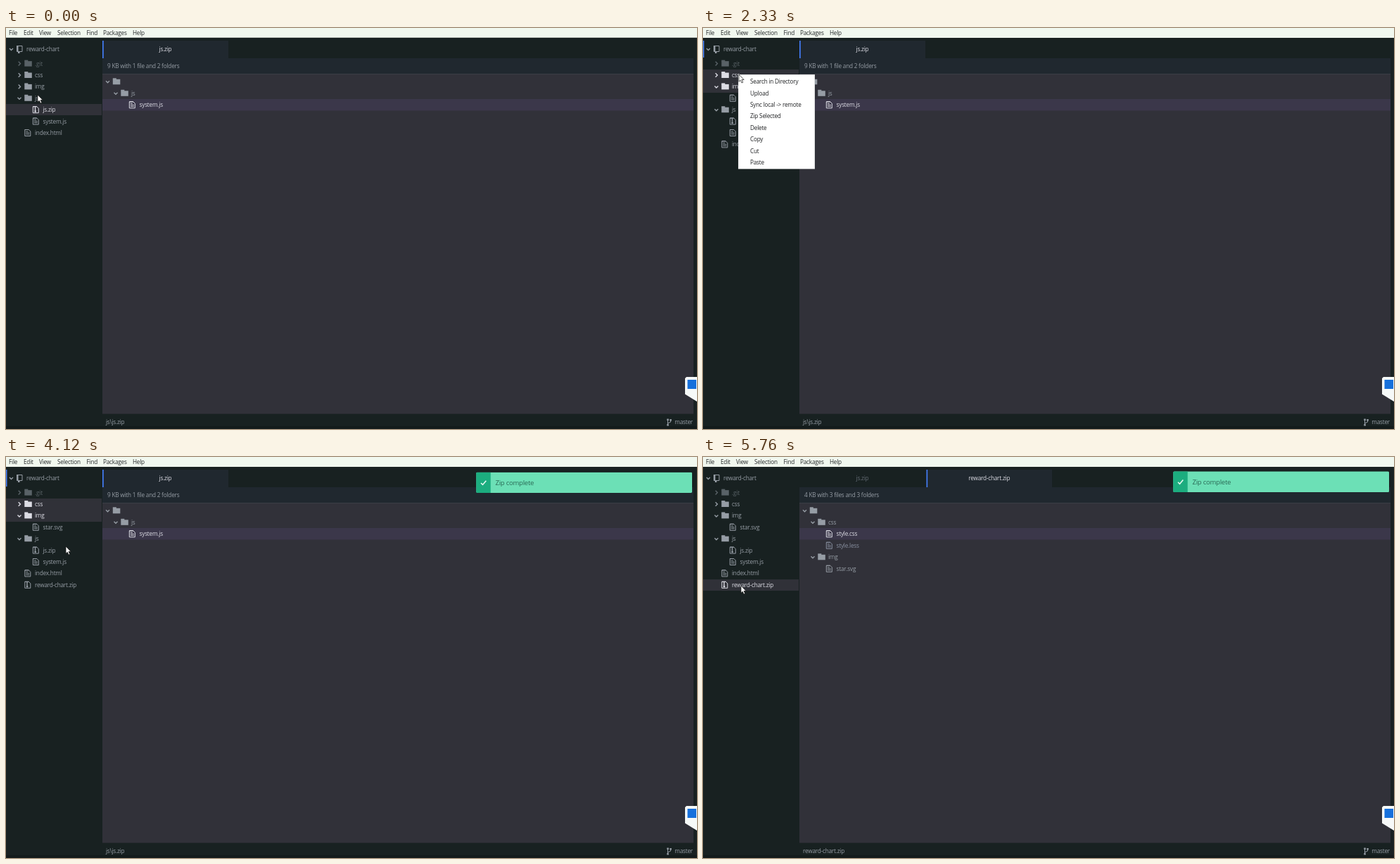
Write an HTML page with a canvas that moves like this. It is 982x570 px and loops after 7.42 s.

```html
<!DOCTYPE html>
<html lang="en">
<head>
<meta charset="utf-8">
<title>Zip selected folders</title>
<style>
  html, body { margin: 0; width: 100%; height: 100%; overflow: hidden; background: #182121; }
  canvas { display: block; }
</style>
</head>
<body>
<canvas id="stage" width="982" height="570"></canvas>
<script>
const ctx = document.getElementById('stage').getContext('2d');
const LOOP = 7420;
const SIDEBAR = '#182121', PANE = '#313139', BAR = '#20282f', ACCENT = '#437cf5';
const MUTED = '#969da5', DIM = '#596267', BRIGHT = '#dcdce4';

// Moments of the interaction, in ms
const IMG_CLICK = 600, CSS_CLICK = 1340, MENU_OPEN = 2330, MENU_HOVER = 2850,
      ZIP_HOVER = 3040, MENU_CLOSE = 3730, ZIP_DONE = 4060, FILE_CLICK = 5320,
      TAB_OPEN = 5580, TAB_READY = 5700;

// Pointer path: time, x, y
const PATH = [
  [90, 45, 95], [560, 47, 86], [850, 47, 86], [1250, 51, 66],
  [2689, 51, 66], [2690, 50, 66], [2820, 50, 66], [2980, 76, 123], [3300, 85, 127],
  [4669, 85, 127], [4670, 85, 128], [4900, 85, 128], [5200, 54, 183]
];

const clamp = v => Math.max(0, Math.min(1, v));
const mix = (a, b, k) => a + (b - a) * k;

function rect(x, y, w, h, color) {
  ctx.fillStyle = color;
  ctx.fillRect(x, y, w, h);
}

function text(str, x, middle, color, align = 'left', size = 8.2) {
  ctx.font = `${size}px "Open Sans", "Noto Sans", sans-serif`;
  ctx.letterSpacing = `${-size / 41}px`;
  ctx.textAlign = align;
  ctx.fillStyle = color;
  ctx.fillText(str, x, middle + 3);
}

function line(points, color, width = 1) {
  ctx.beginPath();
  points.forEach(([x, y]) => ctx.lineTo(x, y));
  ctx.strokeStyle = color;
  ctx.lineWidth = width;
  ctx.stroke();
}

function polygon(points, fill) {
  ctx.beginPath();
  points.forEach(([x, y]) => ctx.lineTo(x, y));
  ctx.closePath();
  ctx.fillStyle = fill;
  ctx.fill();
}

function chevron(x, y, open, color) {
  line(open ? [[x - 2.5, y - 1], [x, y + 1.5], [x + 2.5, y - 1]]
            : [[x - 1.3, y - 2.8], [x + 1.5, y], [x - 1.3, y + 2.8]], color, 1.4);
}

function folder(x, y, color) {
  rect(x, y - 5, 5, 2, color);
  rect(x, y - 3.5, 10.5, 7.5, color);
}

function fileIcon(x, y, color, zip) {
  line([[x + 6, y - 4.5], [x + .5, y - 4.5], [x + .5, y + 4.5], [x + 8.5, y + 4.5],
        [x + 8.5, y - 2], [x + 6, y - 4.5], [x + .5, y - 4.5]], color);
  if (zip) {
    rect(x + 3, y - 4, 1.4, 5, color);
    rect(x + 2.6, y + 1, 2.4, 2.5, color);
  } else {
    for (const dy of [-2, 0, 2]) rect(x + 2, y + dy - .4, dy < 0 ? 3 : 5, .9, color);
  }
}

function repoIcon(x, y, color) {
  line([[x + .5, y + 3.5], [x + .5, y - 4.5], [x + 8, y - 4.5], [x + 8, y + 3.5], [x + .5, y + 3.5]], color);
  rect(x, y - 5, 2.5, 8, color);
  rect(x + 2, y + 3, 2.5, 3, color);
}

function treeItem(item, x, y, step) {
  const color = item.color || (item.selected ? BRIGHT : MUTED);
  const left = x + item.depth * step;
  if (item.folder) {
    chevron(left, y, item.open, color);
    folder(left + 7.3, y, color);
  } else {
    fileIcon(left + 7.3, y, color, item.name.endsWith('.zip'));
  }
  text(item.name, left + 22, y, color);
}

function drawSidebar(t) {
  rect(0, 14, 137, 556, SIDEBAR);
  const expanded = t >= IMG_CLICK;
  const marked = t < IMG_CLICK ? ['js.zip']
    : t < CSS_CLICK ? ['img']
    : t < FILE_CLICK ? ['css', 'img'] : ['reward-chart.zip'];

  const items = [
    { name: '.git', depth: 1, folder: true, color: DIM },
    { name: 'css', depth: 1, folder: true },
    { name: 'img', depth: 1, folder: true, open: expanded },
    ...(expanded ? [{ name: 'star.svg', depth: 2 }] : []),
    { name: 'js', depth: 1, folder: true, open: true },
    { name: 'js.zip', depth: 2 },
    { name: 'system.js', depth: 2 },
    { name: 'index.html', depth: 1 },
    ...(t >= ZIP_DONE ? [{ name: 'reward-chart.zip', depth: 1 }] : [])
  ];

  if (expanded && t < TAB_OPEN) rect(0, 18, 1.5, 24, ACCENT);
  chevron(7.5, 30, true, MUTED);
  repoIcon(15, 30, MUTED);
  text('reward-chart', 29, 30.4, MUTED);
  items.forEach((item, i) => {
    const y = 50.6 + i * 16.4;
    item.selected = marked.includes(item.name);
    if (item.selected) {
      const top = Math.round(y - 8.2);
      rect(0, top, 136, Math.round(y + 8.2) - top, '#303138');
    }
    treeItem(item, 7.5, y, 11.5);
  });
}

function drawTab(x, width, name, active) {
  if (active) {
    rect(x, 18, width, 26, BAR);
    rect(x, 18, 1.7, 25, ACCENT);
  }
  ctx.save();
  ctx.beginPath();
  ctx.rect(x, 18, width, 25);
  ctx.clip();
  text(name, x + width / 2, 30, active ? BRIGHT : '#626a72', 'center');
  ctx.restore();
}

function drawEditor(t) {
  const opened = t >= TAB_OPEN, ready = t >= TAB_READY;
  rect(137, 14, 845, 556, SIDEBAR);
  rect(137, 43, 840, 22, BAR);
  rect(137, 65, 840, 1, '#3a3d45');
  rect(137, 66, 840, 482.5, PANE);

  drawTab(137, 179, 'js.zip', !opened);
  if (opened) drawTab(317.5, 178.5 * clamp((t - TAB_OPEN + 30) / 150), 'reward-chart.zip', true);

  if (!opened || ready) {
    text(ready ? '4 KB with 3 files and 3 folders' : '9 KB with 1 file and 2 folders', 144, 53.6, MUTED);
    rect(137, 101, 840, 16.5, '#3b374a');
    const items = [
      { name: '', depth: 0, folder: true, open: true },
      ...(ready ? [
        { name: 'css', depth: 1, folder: true, open: true },
        { name: 'style.css', depth: 2, selected: true },
        { name: 'style.less', depth: 2, color: '#878f9f' },
        { name: 'img', depth: 1, folder: true, open: true },
        { name: 'star.svg', depth: 2 }
      ] : [
        { name: 'js', depth: 1, folder: true, open: true },
        { name: 'system.js', depth: 2, selected: true }
      ])
    ];
    items.forEach((item, i) => treeItem(item, 144.5, 76.3 + i * 16.5, 11.5));
  }

  text(opened ? 'reward-chart.zip' : 'js\\js.zip', 142, 560.3, MUTED);
  text('master', 976, 560.3, MUTED, 'right');
  line([[940.5, 557], [940.5, 564]], MUTED);
  line([[944.5, 558], [944.5, 560], [940.5, 562]], MUTED);
  for (const [x, y] of [[939.3, 555.5], [939.3, 563], [943.3, 556]]) rect(x, y, 2.5, 2.5, MUTED);
  rect(0, 566, 982, 4, '#131b1b');
}

function drawMenuBar() {
  rect(0, 0, 982, 13.5, '#f1f8ef');
  const entries = { File: 4, Edit: 25, View: 47, Selection: 73, Find: 114.5, Packages: 138, Help: 180 };
  for (const name in entries) text(name, entries[name], 6.8, '#26292b');
}

function drawSideWidget() {
  polygon([[967, 496], [982, 496], [982, 531], [965, 520.5], [965, 498]], '#f6f9f8');
  rect(968.5, 500, 12.5, 13, '#1670dc');
}

function drawContextMenu(t) {
  if (t < MENU_OPEN || t >= MENU_CLOSE) return;
  const entries = ['Search in Directory', 'Upload', 'Sync local -> remote', 'Zip Selected',
                   'Delete', 'Copy', 'Cut', 'Paste'];
  const hovered = t < MENU_HOVER ? -1 : t < ZIP_HOVER ? 0 : 3;
  rect(50, 66, 109, 134.5, '#c9cbcc');
  rect(50.5, 66.5, 108, 133.5, '#fff');
  entries.forEach((name, i) => {
    const y = 76.1 + i * 16.4;
    if (i === hovered) rect(50.5, y - 8.1, 108, 16.2, ACCENT);
    text(name, 67, y, i === hovered ? '#fff' : '#202224');
  });
}

// Cubic bezier (.175, .885, .32, 1.275), solved for x by bisection
function overshoot(x) {
  const curve = (s, a, b) => 3 * (1 - s) ** 2 * s * a + 3 * (1 - s) * s * s * b + s ** 3;
  let low = 0, high = 1;
  for (let i = 0; i < 20; i++) {
    const mid = (low + high) / 2;
    if (curve(mid, .175, .32) < x) low = mid; else high = mid;
  }
  return curve(low, .885, 1.275);
}

function drawNotification(t) {
  if (t < ZIP_DONE) return;
  const k = overshoot(clamp((t - ZIP_DONE + 20) / 160));
  ctx.save();
  ctx.globalAlpha = clamp(k);
  ctx.translate(0, 35.2 + 18 * (k - 1));
  ctx.scale(1, Math.cos((1 - k) * Math.PI / 2));
  ctx.beginPath();
  ctx.roundRect(668.3, -14.7, 306.7, 29.4, 1.5);
  ctx.clip();
  rect(668, -15, 308, 30, '#6ce0b6');
  rect(668, -15, 20.7, 30, '#1cad7f');
  line([[675, .5], [677.5, 3], [682.3, -2.7]], '#e4f8f0', 1.6);
  text('Zip complete', 695.5, .6, '#2a6955', 'left', 9.5);
  ctx.restore();
}

function drawPointer(t) {
  let i = PATH.findIndex(point => point[0] > t);
  if (i < 0) i = PATH.length;
  const from = PATH[Math.max(0, i - 1)], to = PATH[Math.min(i, PATH.length - 1)];
  const k = to === from ? 0 : clamp((t - from[0]) / (to[0] - from[0]));
  ctx.save();
  ctx.translate(mix(from[1], to[1], k), mix(from[2], to[2], k));
  polygon([[0, 0], [0, 10.3], [2.3, 8.2], [4, 12], [5.8, 11.2], [4.1, 7.5], [7.2, 7.5]], '#fff');
  ctx.strokeStyle = '#111';
  ctx.lineWidth = .7;
  ctx.stroke();
  ctx.restore();
}

function frame() {
  const t = performance.now() % LOOP;
  drawSidebar(t);
  drawEditor(t);
  drawMenuBar();
  drawSideWidget();
  drawContextMenu(t);
  drawNotification(t);
  drawPointer(t);
  requestAnimationFrame(frame);
}
frame();
</script>
</body>
</html>
```
